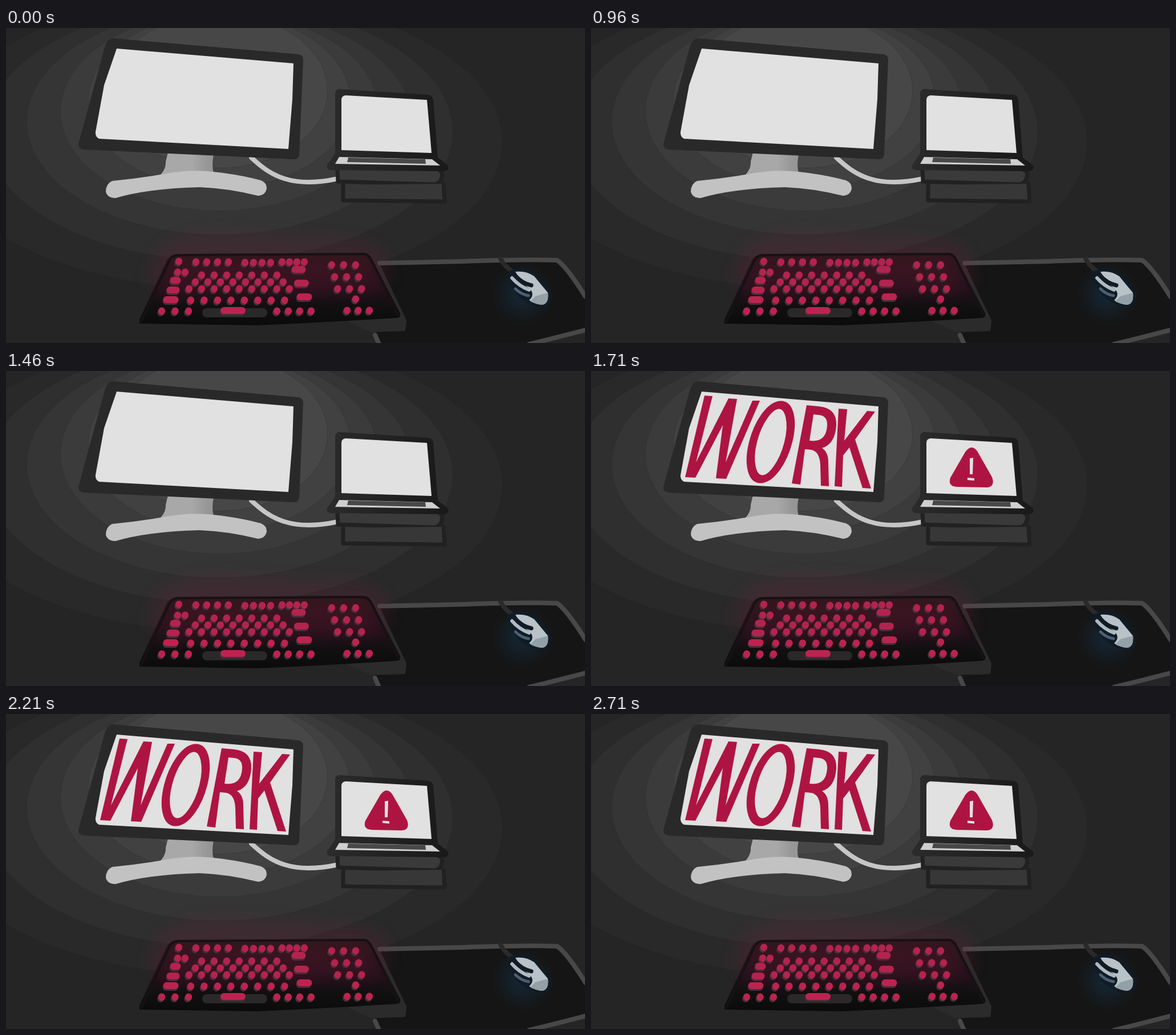
Write an HTML page that moves like this. It is 1015x552 px and loops after 2960 ms.

```html
<!DOCTYPE html>
<html lang="en">
<head>
<meta charset="utf-8">
<title>Desk at work</title>
<style>
  html, body { margin: 0; width: 100%; height: 100%; overflow: hidden; background: #252525; }
  svg { display: block; width: 100%; height: 100%; }
  .line { fill: none; stroke-linecap: round; stroke-linejoin: round; }
  #work, #alert { opacity: 0; }
</style>
</head>
<body>
<svg viewBox="0 0 1015 552" preserveAspectRatio="none">
  <defs>
    <linearGradient id="neck">
      <stop offset=".6" stop-color="#a8a8a8"/><stop offset=".9" stop-color="#969696"/>
    </linearGradient>
    <linearGradient id="lid">
      <stop offset="0" stop-color="#2b2b2b"/><stop offset="1" stop-color="#191919"/>
    </linearGradient>
    <linearGradient id="board" x2="0" y2="1">
      <stop offset="0" stop-color="#30171d"/><stop offset=".5" stop-color="#22111a"/>
      <stop offset=".75" stop-color="#111011"/><stop offset="1" stop-color="#0b0b0b"/>
    </linearGradient>
    <radialGradient id="blue">
      <stop offset=".2" stop-color="#152430"/><stop offset="1" stop-color="#152430" stop-opacity="0"/>
    </radialGradient>
    <filter id="soft" x="-20%" y="-50%" width="140%" height="200%"><feGaussianBlur stdDeviation="13"/></filter>
    <filter id="fuzz"><feGaussianBlur stdDeviation=".7"/></filter>
  </defs>

  <g id="light"></g>

  <!-- monitor -->
  <path class="line" d="M430 227C462 257 498 282 582 264" stroke="#c6c6c6" stroke-width="8"/>
  <path d="M284 218L364 222Q360 240 364 254L268 260Q281 248 280 234Z" fill="url(#neck)"/>
  <path d="M186 268Q230 264 270 257Q320 247 364 252Q410 257 447 267Q457 271 457 281Q455 293 442 294Q390 281 340 279Q250 281 192 298Q178 298 175 287Q175 273 186 268Z" fill="#c2c2c2"/>
  <path d="M188 18L512 46Q521 47 521 56L514 222Q513 230 505 230L136 213Q126 212 127 203L173 34Q177 19 188 18Z" fill="#292929"/>
  <path d="M194 36L504 62L502 125L495 212L163 194Q156 190 157 182L172 100Z" fill="#e1e1e1"/>

  <!-- laptop on its stand -->
  <g class="line" stroke="#212121" stroke-width="7">
    <path d="M581 248L582 269L752 274Q767 270 764 252L758 248" fill="#3a3a3a"/>
    <path d="M591 275L591 302L769 304L767 273" fill="#373737"/>
  </g>
  <path d="M584 107L740 117Q748 118 749 126L757 227L774 240Q779 248 769 251L570 249Q560 248 563 240L577 220L577 114Q578 107 584 107Z" fill="url(#lid)"/>
  <path d="M595 118L738 126L746 219L588 214L588 126Q588 119 595 118Z" fill="#e1e1e1"/>
  <path d="M584 226L747 230L761 241L577 238Z" fill="#cfcfcf"/>
  <path d="M600 227L735 230L736 238L598 235Z" fill="#484848"/>

  <!-- mouse pad -->
  <path d="M655 412L968 407Q985 420 1015 472V530Q970 540 920 552H656L646 532L700 531L702 515Z" fill="#151515"/>
  <path d="M652 408L702 512L700 531L640 533L600 515Z" fill="#2b2b2b"/>
  <path class="line" d="M655 412L800 409Q910 405 966 407Q982 417 1016 471M1016 529Q970 541 917 554M647 538L654 554" stroke="#484848" stroke-width="8"/>

  <!-- keyboard -->
  <path d="M265 388Q320 352 400 360L620 371Q650 380 668 402L672 450L245 450Z" fill="#78203e" opacity=".2" filter="url(#soft)"/>
  <path d="M300 396L628 394Q636 394 641 403L691 500Q693 507 685 508Q560 516 440 521L234 518L234 511L282 407Q288 398 300 396Z" fill="url(#board)"/>
  <path d="M290 408L628 404L655 462L270 470Z" fill="#671530" opacity=".26" filter="url(#soft)"/>
  <path class="line" d="M237 515L286 408Q291 398 302 398L628 396Q635 397 640 406L688 503" stroke="#161214" stroke-width="4"/>
  <rect x="344" y="491" width="114" height="16" rx="8" fill="#2b2829"/>
  <g id="keys"></g>

  <!-- mouse -->
  <circle cx="906" cy="466" r="54" fill="url(#blue)"/>
  <path class="line" d="M867 404Q872 416 888 427" stroke="#2a2a2a" stroke-width="8"/>
  <path d="M879 428Q890 420 905 421Q932 425 957 466Q957 486 942 490Q922 488 902 474Q884 458 879 428Z" fill="#101b25"/>
  <path d="M893 427Q912 425 926 435L950 464Q952 483 940 485Q928 484 917 477Q928 467 918 457Q902 446 893 427Z" fill="#b9c2c9"/>
  <path d="M928 470L950 464Q952 483 940 485Q928 484 919 479Z" fill="#94a0a8"/>
  <g class="line">
    <path d="M892 433Q904 447 921 451" stroke="#101b25" stroke-width="7"/>
    <path d="M887 438Q899 452 917 459" stroke="#aeb9c1" stroke-width="6"/>
    <path d="M893 457Q903 467 916 469" stroke="#4a6072" stroke-width="5"/>
  </g>

  <!-- screen messages -->
  <g id="work" role="img" aria-label="WORK" fill="#ae1442">
    <path d="M199 43L213 44L184 160L241 48L256 49L236 160L283 52L296 52L237 189L219 188L231 95L183 187L165 186Z"/>
    <ellipse rx="31" ry="65" transform="translate(315 124.500) skewX(-14)" fill="none" stroke="#ae1442" stroke-width="14"/>
    <path fill-rule="evenodd" d="M378 60L400 62Q431 65 430 95Q428 128 405 135Q416 142 416 160L417 202L403 201L402 165Q401 140 385 138L375 137L367 199L352 197ZM390 76L383 122Q412 126 414 96Q415 78 399 77Z"/>
    <path d="M434 66L449 67L444 122L484 70L498 71L463 120L491 206L476 205L453 134L442 148L440 203L427 202Z"/>
  </g>
  <g id="alert" filter="url(#fuzz)">
    <path d="M667 134Q673 134 678 142L703 186Q709 203 694 204L641 203Q625 202 630 187L656 142Q662 134 667 134Z" fill="#ae1442"/>
    <path d="M664 153L670 152L669 181L664 181ZM660 187L672 188V192L660 191Z" fill="#e9e2e4"/>
  </g>
</svg>
<script>
const $ = id => document.getElementById(id);

function add(parent, tag, attrs) {
  const node = document.createElementNS(parent.namespaceURI, tag);
  for (const [name, value] of Object.entries(attrs)) node.setAttribute(name, value);
  parent.append(node);
}

// Bands of light on the wall shrink, rise and brighten towards the monitor.
for (let i = 0; i < 6; i++) {
  const gray = 41 + 6 * i;
  add($('light'), 'ellipse', {
    cx: 374, cy: 200 - 18 * i, rx: 496 * 0.825 ** i, ry: 256 * 0.88 ** i,
    fill: `rgb(${gray} ${gray} ${gray})`, stroke: '#262626', 'stroke-opacity': .25,
  });
}

function addKey(x, y, width = 12) {
  const wide = width > 12;
  const height = wide ? 12 : 13;
  const cap = (dx, dy, fill) => add($('keys'), 'rect', {
    x: x - width / 2 + dx, y: y - height / 2 + dy, width, height, rx: 6, fill,
    transform: `rotate(${wide ? 0 : 14} ${x} ${y})`,
  });
  cap(-1, 3, '#45303a');
  cap(0, 0, y > 470 ? '#bd2350' : '#b4234e');
}

function addRow(y, x, step, count) {
  for (let i = 0; i < count; i++) addKey(x + step * i, y);
}

// Function keys in three groups, then staggered letter rows.
addKey(303, 409);
addRow(410, 333, 19, 4);
addRow(411, 419, 15, 4);
addRow(410, 484, 13, 4);
addRow(428, 301, 13, 2);
for (let i = 0; i < 3; i++) addRow(433 + 12 * i, 343 - 11 * i, 22, 7 + i);
addRow(477, 324, 23.5, 8);
addRow(496, 273, 23.5, 3);
addRow(496, 475, 20, 4);

// Number pad, leaning with the edge of the board.
for (let y = 415; y < 470; y += 21) addRow(y, 571 + (y - 415) / 4, 21, 3);
addKey(613, 475);
addRow(495, 598, 19.5, 3);

// Wide keys on both sides and the lit part of the space bar.
for (let i = 0; i < 3; i++) {
  addKey(297 - 4 * i, 442 + 17 * i, 19 + 4 * i);
  addKey(513 + 5 * i, 423 + 24 * i, 25 + i);
}
addKey(398, 495, 44);

const LOOP = 2960;
const STEP = 250;
const FIRST = 210;

// Flash on and off every step, from the given time to the end of the loop.
function flash(id, start) {
  const frames = [{ offset: 0, opacity: 0, easing: 'step-end' }];
  for (let t = start, on = 1; t < LOOP; t += STEP, on = 1 - on) {
    frames.push({ offset: t / LOOP, opacity: on, easing: 'step-end' });
  }
  frames.push({ offset: 1, opacity: 0 });
  $(id).animate(frames, { duration: LOOP, iterations: Infinity });
}

flash('alert', FIRST);
flash('work', FIRST + 6 * STEP);
</script>
</body>
</html>
```
